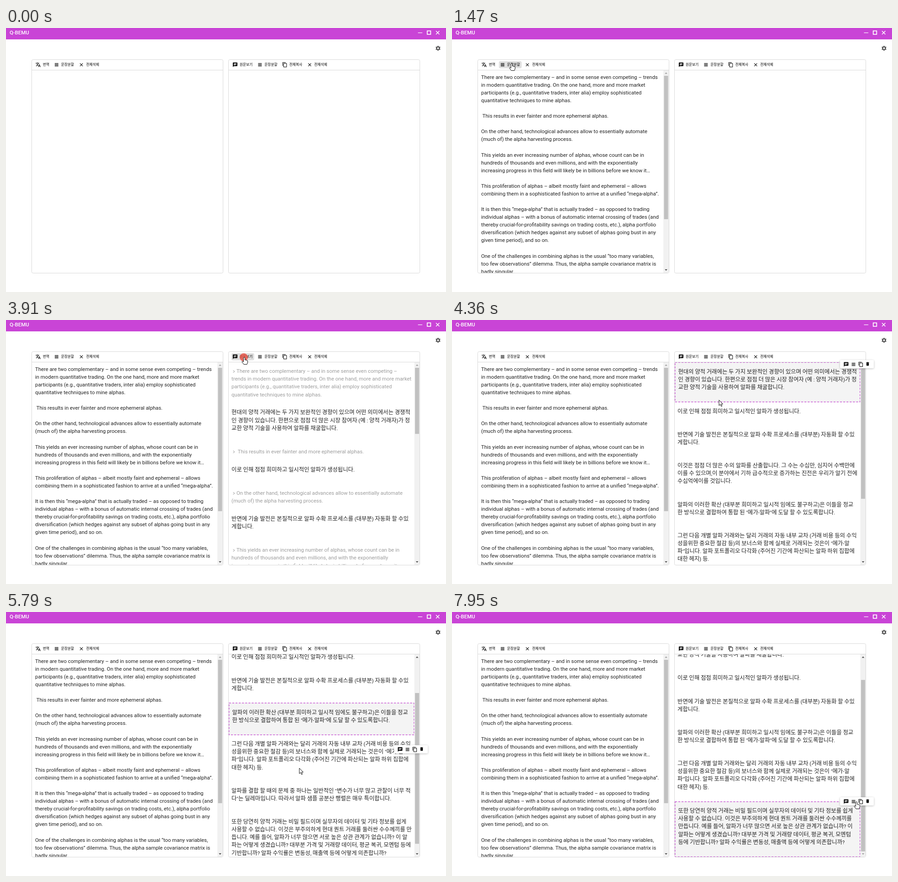
These frames come from a looping animation (966x580 px, 7990 ms). An HTML page with a canvas:

```html
<!DOCTYPE html>
<html lang="ko">
<head>
<meta charset="utf-8">
<style>
html, body { margin: 0; width: 100%; height: 100%; overflow: hidden; background: #fff; }
canvas { display: block; }
</style>
</head>
<body>
<canvas id="stage" width="966" height="580"></canvas>
<script>
const ctx = document.getElementById('stage').getContext('2d');
const LOOP = 7990, LINE = 17.09, PAD = 11.39, BORDER = 1.42;
const VIEW_TOP = 92.5, VIEW_H = 446;
const ACCENT = '#c944d6', INK = '#222', RULE = '#d9d9d9';
const LATIN = '11.39px Roboto, sans-serif';
const CJK = '"Noto Sans CJK KR", "Noto Sans KR", "Noto Sans CJK JP", sans-serif';
const HANGUL = '300 12.38px ' + CJK, LABEL = '7.74px ' + CJK;

const english = [
  'There are two complementary – and in some sense even competing – trends in modern quantitative trading. On the one hand, more and more market participants (e.g., quantitative traders, inter alia) employ sophisticated quantitative techniques to mine alphas.',
  ' This results in ever fainter and more ephemeral alphas.',
  'On the other hand, technological advances allow to essentially automate (much of) the alpha harvesting process.',
  'This yields an ever increasing number of alphas, whose count can be in hundreds of thousands and even millions, and with the exponentially increasing progress in this field will likely be in billions before we know it…',
  'This proliferation of alphas – albeit mostly faint and ephemeral – allows combining them in a sophisticated fashion to arrive at a unified “mega-alpha”.',
  'It is then this “mega-alpha” that is actually traded – as opposed to trading individual alphas – with a bonus of automatic internal crossing of trades (and thereby crucial-for-profitability savings on trading costs, etc.), alpha portfolio diversification (which hedges against any subset of alphas going bust in any given time period), and so on.',
  'One of the challenges in combining alphas is the usual “too many variables, too few observations” dilemma. Thus, the alpha sample covariance matrix is badly singular.',
  'Also, naturally, quantitative trading is a secretive field and data and other information from practitioners is not readily available. This inadvertently creates an enigma around modern quant trading. E.g., with such a large number of alphas, are they not highly correlated with each other? What do these alphas look like? Are they mostly based on price and volume data, mean-reversion, momentum, etc.? How do alpha returns depend on volatility, turnover, etc.?'
];
const korean = [
  '현대의 양적 거래에는 두 가지 보완적인 경향이 있으며 어떤 의미에서는 경쟁적|인 경향이 있습니다. 한편으로 점점 더 많은 시장 참여자 (예 : 양적 거래자)가 정|교한 양적 기술을 사용하여 알파를 채굴합니다.',
  '이로 인해 점점 희미하고 일시적인 알파가 생성됩니다.',
  '반면에 기술 발전은 본질적으로 알파 수확 프로세스를 (대부분) 자동화 할 수있|게합니다.',
  '이것은 점점 더 많은 수의 알파를 산출합니다. 그 수는 수십만, 심지어 수백만에|이를 수 있으며,이 분야에서 기하 급수적으로 증가하는 진전은 우리가 알기 전에|수십억에이를 것입니다.',
  '알파의 이러한 확산 (대부분 희미하고 일시적 임에도 불구하고)은 이들을 정교|한 방식으로 결합하여 통합 된 "메가-알파"에 도달 할 수 있도록합니다.',
  '그런 다음 개별 알파 거래와는 달리 거래의 자동 내부 교차 (거래 비용 등의 수익|성을위한 중요한 절감 등)의 보너스와 함께 실제로 거래되는 것은이 "메가-알|파"입니다. 알파 포트폴리오 다각화 (주어진 기간에 파산되는 알파 하위 집합에|대한 헤지) 등.',
  '알파를 결합 할 때의 문제 중 하나는 일반적인 "변수가 너무 많고 관찰이 너무 적|다"는 딜레마입니다. 따라서 알파 샘플 공분산 행렬은 매우 특이합니다.',
  '또한 당연히 양적 거래는 비밀 필드이며 실무자의 데이터 및 기타 정보를 쉽게|사용할 수 없습니다. 이것은 부주의하게 현대 퀀트 거래를 둘러싼 수수께끼를 만|듭니다. 예를 들어, 알파가 너무 많으면 서로 높은 상관 관계가 없습니까? 이 알|파는 어떻게 생겼습니까? 대부분 가격 및 거래량 데이터, 평균 복귀, 모멘텀 등에|기반합니까? 알파 수익률은 변동성, 매출액 등에 어떻게 의존합니까?'
].map(s => s.split('|'));
// The dashed frame narrows the column, so these two wrap differently.
const framed = {
  3: [korean[3][0], korean[3][1].slice(0, -1), '에 ' + korean[3][2]],
  7: [korean[7][0], korean[7][1].slice(0, -2), '만듭니다. 예를 들어, 알파가 너무 많으면 서로 높은 상관 관계가 없습니까? 이',
    '알파는 어떻게 생겼습니까? 대부분 가격 및 거래량 데이터, 평균 복귀, 모멘텀', '등에 ' + korean[7][4]]
};

const icons = {
  translate: 'M12.87 15.07l-2.54-2.51.03-.03c1.74-1.94 2.98-4.17 3.71-6.53H17V4h-7V2H8v2H1v1.99h11.17C11.5 7.92 10.44 9.75 9 11.35 8.07 10.32 7.3 9.19 6.69 8h-2c.73 1.63 1.73 3.17 2.98 4.56l-5.09 5.02L4 19l5-5 3.11 3.11.76-2.04zM18.5 10h-2L12 22h2l1.12-3h4.75L21 22h2l-4.5-12zm-2.62 7l1.62-4.33L19.12 17h-3.24z',
  rows: 'M4 15h16v-2H4zM4 19h16v-2H4zM4 11h16V9H4zM4 5v2h16V5z',
  clear: 'M19 6.41L17.59 5 12 10.59 6.41 5 5 6.41 10.59 12 5 17.59 6.41 19 12 13.41 17.59 19 19 17.59 13.41 12z',
  chat: 'M20 2H4c-1.1 0-2 .9-2 2v18l4-4h14c1.1 0 2-.9 2-2V4c0-1.1-.9-2-2-2zM6 9h12v2H6zM14 14H6v-2h8zM18 8H6V6h12z',
  copy: 'M16 1H4c-1.1 0-2 .9-2 2v14h2V3h12zM19 5H8c-1.1 0-2 .9-2 2v14c0 1.1.9 2 2 2h11c1.1 0 2-.9 2-2V7c0-1.1-.9-2-2-2zM19 21H8V7h11z',
  trash: 'M6 19c0 1.1.9 2 2 2h8c1.1 0 2-.9 2-2V7H6zM19 4h-3.5l-1-1h-5l-1 1H5v2h14z'
};
const pointers = {
  arrow: 'M0 0V12.2L2.9 9.6 4.9 14 6.8 13.2 4.9 8.9H8.6z',
  hand: 'M-1.6 1.5a1.6 1.6 0 0 1 3.2 0V5.6l3.4.6 2.6 1.4V11l-1.6 4.5h-7L-5 9.8-3.8 8.4l2.2 1.6z',
  beam: 'M-2.5 -5.5H2.5M0 -5.5V5.5M-2.5 5.5H2.5'
};
for (const set of [icons, pointers])
  for (const key in set) set[key] = new Path2D(set[key]);

// time, x, y, pointer
const path = [
  [250, 697, 553, 'arrow'], [400, 480, 420, 'arrow'], [440, 400, 370, 'beam'], [560, 230, 300, 'beam'],
  [1020, 230, 300, 'beam'], [1140, 145, 100, 'arrow'], [1180, 131, 78, 'hand'], [1480, 131, 78, 'hand'],
  [1560, 115, 58, 'arrow'], [1660, 100, 54, 'arrow'], [1810, 100, 54, 'arrow'], [1850, 84, 78, 'hand'],
  [1980, 83, 78, 'arrow'], [2680, 83, 78, 'arrow'], [2800, 300, 30, 'arrow'], [2920, 608, 45, 'arrow'],
  [3040, 560, 69, 'arrow'], [3160, 530, 79, 'hand'], [3240, 523, 82, 'hand'], [3990, 523, 82, 'hand'],
  [4070, 540, 95, 'arrow'], [4700, 640, 270, 'arrow'], [4780, 640, 270, 'arrow'], [4900, 643.5, 342.6, 'arrow'],
  [5060, 643.5, 342.6, 'arrow'], [5100, 644, 343, 'arrow'], [5900, 644, 343, 'arrow'], [6220, 653, 371, 'beam'],
  [6480, 653, 371, 'beam'], [6620, 693, 371, 'beam'], [6920, 693, 371, 'beam'], [7060, 840, 360, 'arrow'],
  [7160, 912, 351, 'hand'], [7380, 912, 351, 'arrow'], [7730, 853, 451, 'arrow'], [7880, 884, 422, 'hand'],
  [7950, 888, 417, 'hand']
];
// time, selected paragraph, tool strip centre
const selections = [
  [0, -1, 0], [4140, 0, 97], [4420, 1, 182], [4580, 2, 233], [4820, 3, 301.5], [5450, 4, 301.5],
  [5840, 6, 351], [7300, 5, 316], [7600, 7, 416]
];
const scrolling = [[0, 0], [5700, 0], [5790, 98], [5880, 125], [LOOP, 125]];
const clicks = [[1200, 131, 80], [1890, 84, 80], [3390, 522, 82], [3910, 522, 82], [7220, 912, 351]];

const lastAt = (keys, t) => keys.filter(k => k[0] <= t).pop();
const within = (t, a, b) => t >= a && t < b;

function tween(keys, t) {
  const i = keys.findIndex(k => k[0] > t);
  if (i < 0) return keys[keys.length - 1].slice(1);
  const a = keys[i - 1], b = keys[i], u = (t - a[0]) / (b[0] - a[0]);
  return a.slice(1).map((v, j) => typeof v === 'number' ? v + (b[j + 1] - v) * u : v);
}

function text(str, x, y, font, color = INK) {
  ctx.font = font;
  ctx.fillStyle = color;
  ctx.fillText(str, x, y);
}

// Hangul and Latin runs each keep their own font.
function mixedText(str, x, y) {
  for (const run of str.split(/([가-힣]+)/)) {
    text(run, x, y, /[가-힣]/.test(run) ? HANGUL : LATIN);
    x += ctx.measureText(run).width;
  }
}

function rect(x, y, w, h, color, r = 0) {
  ctx.fillStyle = color;
  ctx.beginPath();
  ctx.roundRect(x, y, w, h, r);
  ctx.fill();
}

function wrap(str, width, indent = 0) {
  ctx.font = LATIN;
  const lines = [];
  let line = null;
  for (const word of str.split(' ')) {
    const next = line === null ? word : line + ' ' + word;
    const room = width - (lines.length ? 0 : indent);
    if (ctx.measureText(next).width > room) {
      lines.push(line);
      line = word;
    } else line = next;
  }
  return [...lines, line];
}

function icon(name, cx, cy, size = 12) {
  ctx.save();
  ctx.translate(cx - size / 2, cy - size / 2);
  ctx.scale(size / 24, size / 24);
  ctx.fillStyle = '#000';
  ctx.fill(icons[name], 'evenodd');
  ctx.restore();
}

function stroke(color, width, draw) {
  ctx.strokeStyle = color;
  ctx.lineWidth = width;
  ctx.beginPath();
  draw();
  ctx.stroke();
}

function gear(cx, cy) {
  ctx.fillStyle = '#555';
  ctx.beginPath();
  for (let i = 0; i < 24; i++) {
    const a = (i - 0.5) * Math.PI / 12 + Math.PI / 6, r = i % 4 < 2 ? 5.6 : 4.1;
    ctx.lineTo(cx + r * Math.cos(a), cy + r * Math.sin(a));
  }
  ctx.closePath();
  ctx.moveTo(cx + 1.9, cy);
  ctx.arc(cx, cy, 1.9, 0, 7);
  ctx.fill('evenodd');
}

function titleBar() {
  rect(0, 0, 966, 25, ACCENT);
  text('Q-BEMU', 8, 14.2, '500 11.4px Roboto, sans-serif', '#fff');
  stroke('#fff', 1.2, () => { ctx.moveTo(904.5, 10.5); ctx.lineTo(914, 10.5); });
  stroke('#fff', 1.8, () => ctx.rect(924.8, 6.4, 7.5, 7.5));
  stroke('#fff', 1.5, () => {
    ctx.moveTo(944, 6.5); ctx.lineTo(951.5, 14);
    ctx.moveTo(951.5, 6.5); ctx.lineTo(944, 14);
  });
  gear(948.5, 44.5);
}

function panel(x) {
  stroke(RULE, 1, () => {
    ctx.roundRect(x, 69.5, 420, 469, 3);
    ctx.moveTo(x, 92.5);
    ctx.lineTo(x + 420, 92.5);
  });
}

function tools(items, t) {
  for (const [name, cx, label, x, ...hovers] of items) {
    for (const [from, to] of hovers)
      if (within(t, from, to)) rect(cx - 8, 73, 20 + label.length * 7.2 + 1, 15.5, '#dfdfdf', 3);
    icon(name, cx, 80.7);
    text(label, x, 83.4, LABEL, '#000');
  }
}

function scrollbar(x, total, scroll) {
  rect(x, 93, 12, 445, '#f1f1f1');
  rect(x + 1.5, 105 + scroll / total * 421, 9, VIEW_H / total * 421, '#c1c1c1');
  const arrow = (y, dir, on) => {
    ctx.fillStyle = on ? '#505050' : '#a3a3a3';
    ctx.beginPath();
    ctx.moveTo(x + 3.2, y - dir * 1.5);
    ctx.lineTo(x + 8.8, y - dir * 1.5);
    ctx.lineTo(x + 6, y + dir * 1.7);
    ctx.fill();
  };
  arrow(99.3, -1, scroll > 0.5);
  arrow(531.5, 1, scroll < total - VIEW_H - 0.5);
}

function clipped(x, draw) {
  ctx.save();
  ctx.beginPath();
  ctx.rect(x, 93, 419, 445);
  ctx.clip();
  draw();
  ctx.restore();
}

function leftPane(t) {
  if (within(t, 520, 750)) rect(64, 102, 1, 12, '#000');
  if (t < 750) return;
  const split = t >= 1220;
  const lines = split
    ? english.flatMap((p, i) => i ? ['', ...wrap(p, 393)] : wrap(p, 393))
    : wrap(english.map(p => p.trim()).join(' '), 405);
  clipped(57, () => lines.forEach((line, i) => text(line, 64, 111.6 + i * LINE, LATIN)));
  if (split) scrollbar(464, 596, 0);
}

function block(i, top, selected, source, lines) {
  let x = 495, y = top + 23.8;
  if (selected) {
    const h = (lines.length + 2) * LINE + 2 * BORDER;
    rect(489, top, 407, h, '#f4f4f4');
    ctx.setLineDash([3 * BORDER, 2 * BORDER]);
    stroke('#cb5fd6', BORDER, () => ctx.rect(489.7, top + 0.7, 406, h - BORDER));
    ctx.setLineDash([]);
    x += BORDER;
    y += BORDER;
  }
  if (source.length) {
    stroke('#777', 1, () => {
      ctx.moveTo(x + 4, y - 5.8); ctx.lineTo(x + 6.6, y - 3.2); ctx.lineTo(x + 4, y - 0.6);
    });
    source.forEach((line, k) => text(line, x + (k ? 0 : 11), y + k * LINE, LATIN, '#9c9c9c'));
    y += source.length * LINE + 2 * PAD;
  }
  lines.forEach((line, k) => mixedText(line, x, y + k * LINE));
}

function rightPane(t) {
  if (t < 2220) return;
  const [, selected, stripY] = lastAt(selections, t);
  const bilingual = within(t, 3420, 3950);
  let total = 0;
  const blocks = [];
  korean.forEach((plain, i) => {
    if (i === 3 && t >= 5450 || i === 6 && t >= 7300) return;
    const on = i === selected;
    const lines = on && framed[i] || plain;
    const source = bilingual ? wrap(english[i], 396, 11) : [];
    blocks.push([i, total, on, source, lines]);
    total += (lines.length + source.length + 2) * LINE
      + (on ? 2 * BORDER : 0) + (bilingual ? 2 * PAD : 0);
  });
  const scroll = Math.min(tween(scrolling, t)[0], total - VIEW_H);
  clipped(489, () => {
    for (const [i, top, ...rest] of blocks) block(i, VIEW_TOP + top - scroll, ...rest);
    scrollbar(896.5, total, scroll);
  });
  if (selected >= 0) toolStrip(stripY);
}

function toolStrip(y) {
  ctx.save();
  ctx.shadowColor = 'rgba(0,0,0,.25)';
  ctx.shadowBlur = 4;
  ctx.shadowOffsetY = 1;
  rect(852, y - 9, 74, 18, '#fff', 2);
  ctx.restore();
  icon('chat', 865.3, y + 0.5);
  icon('rows', 881.5, y + 0.5);
  icon('copy', 897.5, y + 0.5);
  icon('trash', 912.5, y - 0.5, 10.5);
}

function spinner(t) {
  if (!within(t, 1980, 2220)) return;
  const a = t / 140;
  stroke(ACCENT, 2.5, () => ctx.arc(480, 322, 13, a, a + 4.2));
}

function pointer(t) {
  for (const [start, x, y] of clicks) {
    const u = (t - start) / 260;
    if (u < 0 || u >= 1) continue;
    ctx.fillStyle = `rgba(236,78,66,${0.78 * (1 - u)})`;
    ctx.beginPath();
    ctx.arc(x, y, 9 + u, 0, 7);
    ctx.fill();
  }
  if (t < path[0][0]) return;
  const [x, y, kind] = tween(path, t);
  ctx.save();
  ctx.translate(x, y);
  ctx.lineWidth = 1;
  ctx.lineJoin = 'round';
  ctx.strokeStyle = '#111';
  ctx.fillStyle = '#fff';
  if (kind !== 'beam') ctx.fill(pointers[kind]);
  ctx.stroke(pointers[kind]);
  ctx.restore();
}

function frame(now) {
  const t = now % LOOP;
  rect(0, 0, 966, 580, '#fff');
  titleBar();
  panel(56.5);
  panel(488.5);
  tools([
    ['translate', 70.5, '번역', 81, [1850, 1980]],
    ['rows', 111, '문장분할', 121, [1160, 1520]],
    ['clear', 165.5, '전체삭제', 176],
    ['chat', 503, '원문보기', 513, [3140, 4040]],
    ['rows', 557.5, '문장분할', 567.5],
    ['copy', 612, '전체복사', 622],
    ['clear', 666.7, '전체삭제', 676.7]
  ], t);
  leftPane(t);
  rightPane(t);
  spinner(t);
  pointer(t);
  requestAnimationFrame(frame);
}
requestAnimationFrame(frame);
</script>
</body>
</html>
```
